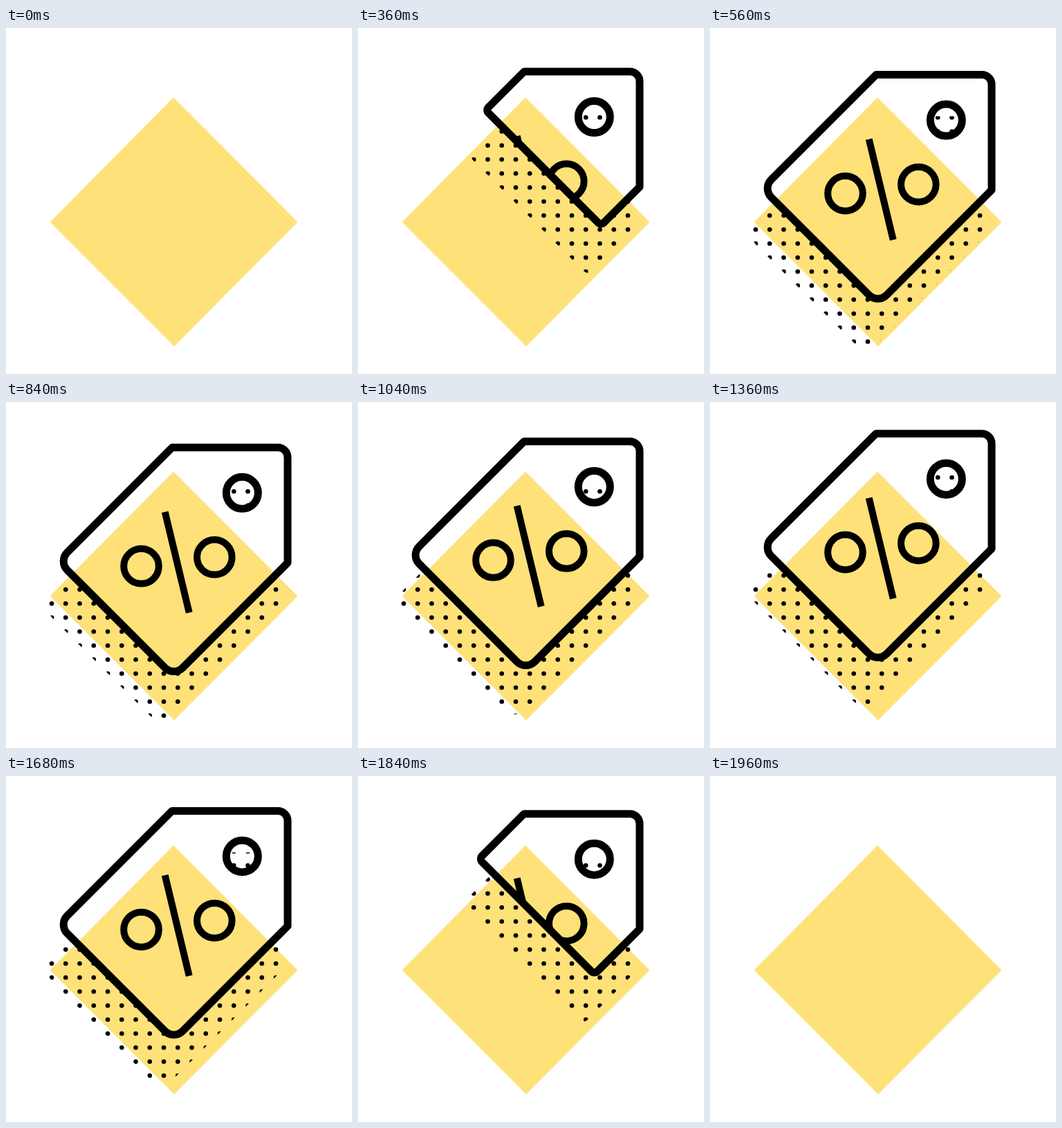
Write an HTML page with a canvas that moves like this. It is 500 px wide and 500 px high and loops after 2 s.

```html
<!DOCTYPE html>
<html lang="en">
<head>
<meta charset="utf-8">
<title>Discount tag</title>
<style>
  html, body { margin: 0; width: 100%; height: 100%; overflow: hidden; background: #fff; }
  canvas { display: block; width: 500px; height: 500px; }
</style>
</head>
<body>
<canvas id="stage" width="500" height="500"></canvas>
<script>
const ctx = document.getElementById('stage').getContext('2d');
const LOOP = 2000, STEP = 40, LINE = 11;
const SHADOW = { x: -17.5, y: 65.5 };
const DOTS = { x: 66, y: 28, gap: 20.25, r: 3.3 };

// Height of the tag's top edge: [time, y]
const BOB = [[0, 56.5], [680, 68.5], [1400, 45.5], [2000, 56.5]];

function bob(t) {
  const i = BOB.findIndex(k => k[0] > t);
  const [t0, a] = BOB[i - 1], [t1, b] = BOB[i];
  return a + (b - a) * (1 - Math.cos(Math.PI * (t - t0) / (t1 - t0))) / 2;
}

const clamp = v => Math.max(0, Math.min(1, v));

function growth(t) {
  return t < 1000 ? clamp((t - 104) / 456) : clamp((1960 - t) / 200);
}

// Tag outline, cut off by a diagonal that sweeps down-left as p grows.
function tagPath(top, p, out = 0, dx = 0, dy = 0) {
  const d = out * Math.SQRT2;
  const upper = 240 + top - d;            // x + y of the upper-left side
  const lower = 573.5 + top + d;          // x + y of the lower-right side
  const cut = top - 407 + 495.5 * p + d;  // y - x of the sweeping side
  const y0 = top - out, x1 = 407 + out;
  const soft = 18 * p * p + out;
  const pts = [];
  const tl = upper - y0, br = lower - x1;

  if (cut > y0 - tl) {
    pts.push([(upper - cut) / 2, (upper + cut) / 2, soft], [tl, y0, 0]);
  } else {
    pts.push([y0 - cut, y0, soft]);
  }
  const size = Math.max(0, x1 + cut - y0);
  pts.push([x1, y0, Math.min(14 + out, size * 0.4)]);
  if (cut > br - x1) {
    pts.push([x1, br, 0], [(lower - cut) / 2, (lower + cut) / 2, soft]);
  } else {
    pts.push([x1, x1 + cut, Math.min(soft, size * 0.2)]);
  }

  const path = new Path2D(), n = pts.length;
  const [a, b] = [pts[0], pts[n - 1]];
  path.moveTo((a[0] + b[0]) / 2 + dx, (a[1] + b[1]) / 2 + dy);
  pts.forEach(([x, y, r], i) => {
    const next = i < n - 1 ? pts[i + 1] : [(a[0] + b[0]) / 2, (a[1] + b[1]) / 2];
    if (r) path.arcTo(x + dx, y + dy, next[0] + dx, next[1] + dy, r);
    else path.lineTo(x + dx, y + dy);
  });
  path.closePath();
  return path;
}

function circle(x, y, r) {
  const path = new Path2D();
  path.arc(x, y, r, 0, Math.PI * 2);
  return path;
}

function clipped(draw, ...clips) {
  ctx.save();
  clips.forEach(c => ctx.clip(c, 'evenodd'));
  draw();
  ctx.restore();
}

function dots() {
  ctx.fillStyle = '#000';
  for (let i = 0; i < 18; i++) {
    for (let j = 0; j < 23; j++) {
      ctx.fill(circle(DOTS.x + i * DOTS.gap, DOTS.y + j * DOTS.gap, DOTS.r));
    }
  }
}

function diamond() {
  ctx.fillStyle = '#ffe17a';
  ctx.beginPath();
  ctx.moveTo(242, 100.5);
  ctx.lineTo(421.5, 280.5);
  ctx.lineTo(243, 460);
  ctx.lineTo(63.5, 280.5);
  ctx.fill();
}

function marks(top, hole) {
  ctx.lineWidth = 10;
  ctx.stroke(circle(195.5, top + 171.5, 25.3));
  ctx.stroke(circle(301.3, top + 158.5, 25.3));
  ctx.beginPath();
  ctx.moveTo(229.7, top + 93);
  ctx.lineTo(264.7, top + 238.5);
  ctx.stroke();
  ctx.lineWidth = LINE;
  ctx.stroke(hole);
}

function render(t) {
  ctx.fillStyle = '#fff';
  ctx.fillRect(0, 0, 500, 500);
  diamond();

  const p = growth(t);
  if (p <= 0) return;
  const top = bob(t);
  const tag = tagPath(top, p);
  const shade = tagPath(top, p, LINE / 2, SHADOW.x, SHADOW.y);
  const hole = circle(341.3, top + 65.5, 23);
  const outside = new Path2D();
  outside.rect(0, 0, 500, 500);
  outside.addPath(tag);

  clipped(dots, shade, outside);
  clipped(dots, shade, tag, hole);

  ctx.strokeStyle = '#000';
  ctx.lineJoin = 'round';
  clipped(() => marks(top, hole), tag);
  ctx.lineWidth = LINE;
  ctx.stroke(tag);
}

const start = performance.now();
function tick() {
  const t = Math.max(0, performance.now() - start) % LOOP;
  render(Math.floor(t / STEP) * STEP);
  requestAnimationFrame(tick);
}
tick();
</script>
</body>
</html>
```
